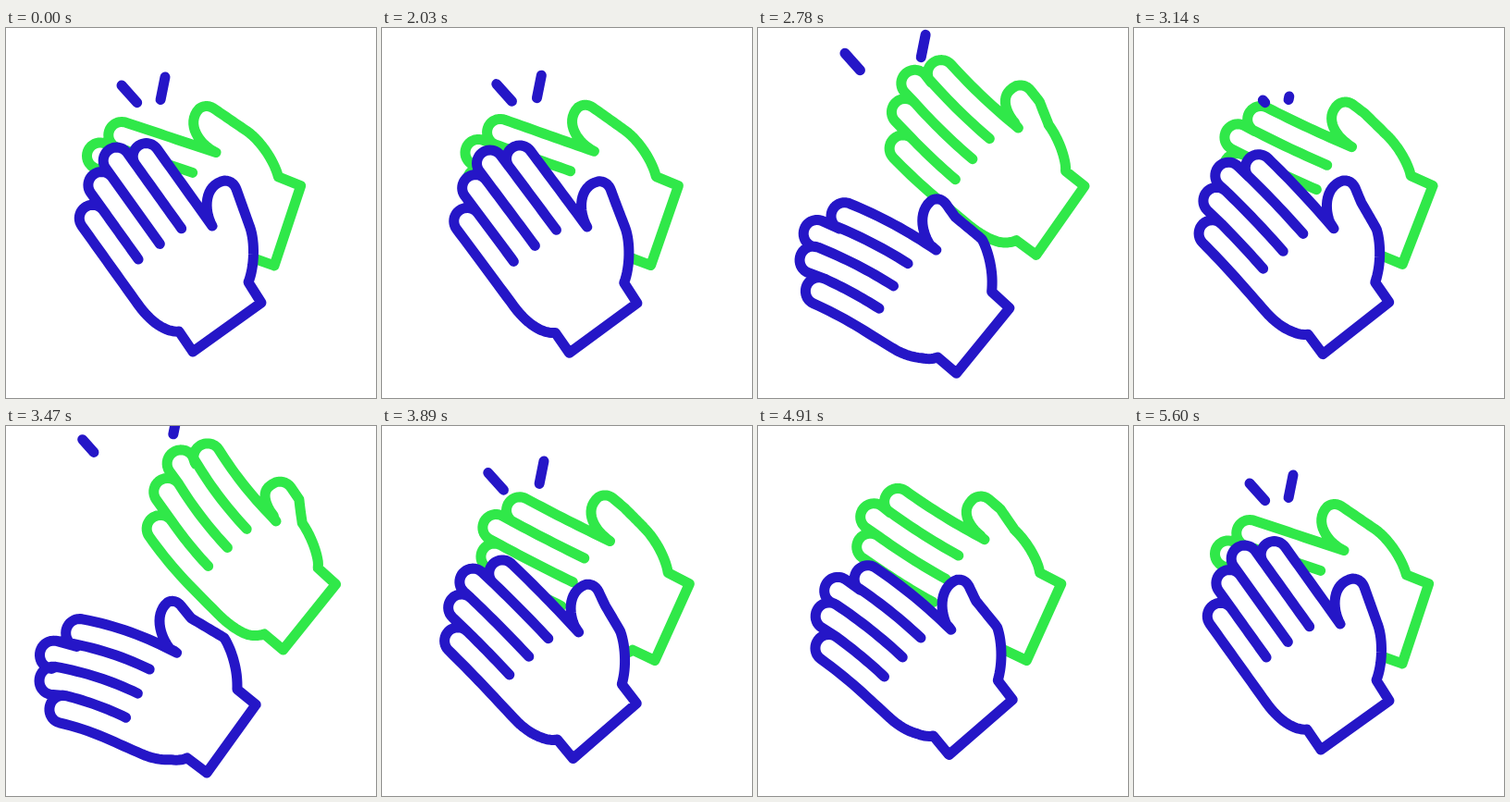
These frames come from a looping animation (400x400 px, 5.63 s). An HTML page with a canvas:

```html
<!DOCTYPE html>
<html lang="en">
<head>
<meta charset="utf-8">
<title>Clapping hands</title>
<style>
  html, body { margin: 0; width: 100%; height: 100%; overflow: hidden; background: #fff; }
  canvas { display: block; width: 400px; height: 400px; }
</style>
</head>
<body>
<canvas id="stage"></canvas>
<script>
const LOOP = 5630, START = 2000, CLAP = 600, CLAPS = 6, STEP = 30;
const BLUE = '#2516c7', GREEN = '#30e849';
const SPARK_LEN = 25, SPARK_FLIGHT = 63.5;
const REBOUND = 0.15; // size of the last, soft clap

const canvas = document.getElementById('stage');
const ctx = canvas.getContext('2d');
const dpr = window.devicePixelRatio || 1;
canvas.width = canvas.height = 400 * dpr;

const clamp = x => Math.min(1, Math.max(0, x));
const ease = x => (1 - Math.cos(Math.PI * clamp(x))) / 2;
// Opens during "rise", stays until "hold", is closed again at the end of the clap
const swing = (t, rise, hold) => ease(t / rise) * (1 - ease((t - hold) / (CLAP - hold)));

// Hand outline in local units: a runs from wrist to fingertips, b across the palm.
// Points of a finger also carry the b of its axis.
const KNUCKLE = 112, CENTER = [75, 44];
const TIPS = [180.5, 204, 216, 201]; // pinky to index
const side = i => -18.4 + 28.65 * i;
const axis = i => side(i + 0.5);

const steps = (n, f) => Array.from({ length: n + 1 }, (_, i) => f(i / n));
const line = (p, q, mid) =>
  steps(16, s => [p[0] + (q[0] - p[0]) * s, p[1] + (q[1] - p[1]) * s, mid]);
const cubic = (p, c, d, q) => steps(16, s => {
  const r = 1 - s;
  return [0, 1].map(k =>
    r * r * r * p[k] + 3 * r * r * s * c[k] + 3 * r * s * s * d[k] + s * s * s * q[k]);
});
const tip = (a, i) => steps(20, s => {
  const r = side(0.5) - side(0), w = Math.PI * s;
  return [a + r * Math.sin(w), axis(i) - r * Math.cos(w), axis(i)];
});

const OUTLINE = [
  [0, 0],
  ...cubic([26.6, 0.6], [32, -9], [48, -18.4], [76, -18.4]),
  ...line([76, side(0)], [TIPS[0], side(0)], axis(0)),
  ...TIPS.flatMap(tip),
  ...line([TIPS[3], side(4)], [98.4, side(4)], axis(3)),
  ...cubic([98.4, 96.2], [118, 98.5], [139.7, 115], [130.6, 135.3]),
  ...cubic([130.6, 135.3], [126.5, 141], [121, 141.9], [115.7, 140.6]),
  ...line([115.7, 140.6], [72.9, 128.4]),
  ...cubic([72.9, 128.4], [57.7, 123.7], [36.6, 108.6], [26.1, 92.5]),
  [0, 91]
];
const GAPS = [0, 1, 2].map(i =>
  line([TIPS[i], side(i + 1)], [115.5, side(i + 1)], axis(i)));

// Swings the palm sideways, curls the fingers and spreads the thumb
function bend([a, b, mid], k, pivot) {
  const w = b > 97 ? clamp((a - 70) / 30) : clamp((a - 40) / (KNUCKLE - 40));
  const t = mid === undefined ? 0 : Math.max(0, a - KNUCKLE);
  const off = t ? b - mid : 0, curl = 0.003 * k * t;
  const thumb = clamp((b - 97) / 30) * (6.5 * k - 4.5 * k * k);
  return [
    a + k * w * 0.166 * (b - pivot) - 0.0004 * k * k * t * t + off * Math.sin(curl),
    b - k * (12 * w + 0.166 * t + 0.0015 * t * t) + off * (Math.cos(curl) - 1) + thumb
  ];
}

function hand(x, y, deg, k, pivot, color) {
  const c = Math.cos(deg * Math.PI / 180), s = Math.sin(deg * Math.PI / 180);
  const trace = points => points.forEach((p, i) => {
    const [pa, pb] = bend(p, k, pivot);
    const a = pa - CENTER[0], b = pb - CENTER[1];
    ctx[i ? 'lineTo' : 'moveTo'](x + a * s + b * c, y - a * c + b * s);
  });
  ctx.strokeStyle = color;
  ctx.beginPath();
  trace(OUTLINE);
  ctx.closePath();
  ctx.fill();
  GAPS.forEach(trace);
  ctx.stroke();
}

// Two dashes, each "len" long, moved outward by "head"
function sparks(head, len) {
  ctx.strokeStyle = BLUE;
  for (const [x, y, dx, dy] of [[125, 62, -0.667, -0.746], [172, 53, 0.196, -0.98]]) {
    const end = head - Math.max(len, 0.01);
    ctx.beginPath();
    ctx.moveTo(x + dx * head, y + dy * head);
    ctx.lineTo(x + dx * end, y + dy * end);
    ctx.stroke();
  }
}

function draw(time) {
  const run = Math.floor((time - START) / STEP) * STEP;
  const active = run > 0 && run < CLAP * CLAPS;
  const n = active ? Math.floor(run / CLAP) : 0;
  const t = active ? run % CLAP : 0;
  const soft = n === CLAPS - 1;
  const amp = soft ? REBOUND : 1;

  const shift = amp * swing(t, 230, 300);
  const turn = amp * swing(t, 250, 350);
  const curl = amp * swing(t, 300, 437) * 1.05;

  ctx.setTransform(dpr, 0, 0, dpr, 0, 0);
  ctx.fillStyle = '#fff';
  ctx.fillRect(0, 0, 400, 400);
  ctx.lineWidth = 11;
  ctx.lineCap = ctx.lineJoin = 'round';

  hand(232.7 + 36 * shift, 191.5 - 30.8 * turn, -71.6 + 20.4 * turn, -0.74 * curl, 45, GREEN);
  hand(194.1 - 12.2 * turn, 263.4 + 32 * shift, -35.6 - 18.6 * turn, curl, 68, BLUE);

  if (!soft && t < 500) {
    sparks(SPARK_FLIGHT * ease(t / 275), SPARK_LEN * (1 - ease((t - 160) / 320)));
  } else if (t > 530 && n !== CLAPS - 2) {
    const len = SPARK_LEN * (t - 530) / 70;
    sparks(len - SPARK_LEN, len);
  }
}

const begin = performance.now();
function tick() {
  draw((performance.now() - begin) % LOOP);
  requestAnimationFrame(tick);
}
tick();
</script>
</body>
</html>
```
